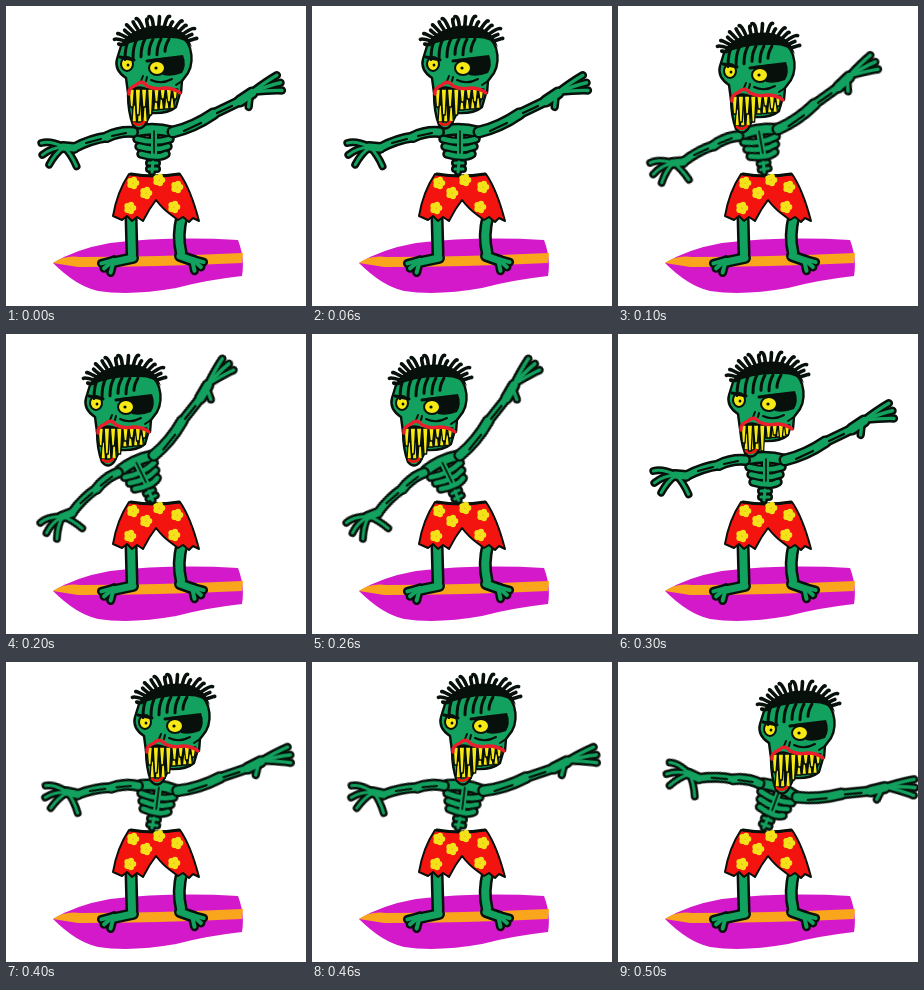
An HTML page for the animation above (600 ms loop, 300x300 px).

```html
<!DOCTYPE html>
<html lang="en">
<head>
<meta charset="utf-8">
<title>Surfing zombie</title>
<style>
  html, body { margin: 0; width: 100%; height: 100%; overflow: hidden; background: #fff; }
  svg { display: block; width: 100vw; height: 100vh; }
  path { fill: none; stroke-linecap: round; stroke-linejoin: round; }
  .soft { filter: blur(.6px); }
  #body { transform-origin: 147px 165px; }
</style>
</head>
<body>
<svg viewBox="0 0 300 300">
  <g id="board" class="soft"></g>
  <g id="legs"></g>
  <g id="shorts"></g>
  <g id="body"></g>
  <g id="head"><g id="jaw"></g><g id="skull"></g></g>
</svg>
<script>
  const INK = "#07100a", SKIN = "#12a15e", YELLOW = "#f6e914", RED = "#f3130f";
  const $ = id => document.getElementById(id);
  const range = n => [...Array(n).keys()];

  let seed = 7;
  const rand = () => (seed = seed * 16807 % 2147483647) / 2147483647;

  function draw(parent, d, fill, stroke = "none", width = 0) {
    const p = document.createElementNS("http://www.w3.org/2000/svg", "path");
    p.setAttribute("d", d);
    p.style.cssText = `fill:${fill};stroke:${stroke};stroke-width:${width}px`;
    $(parent).append(p);
  }
  const line = (parent, d, width = 2, color = INK) => draw(parent, d, "none", color, width);
  const oval = (x, y, rx, ry) => `M${x - rx} ${y}a${rx} ${ry} 0 1 0 ${2 * rx} 0a${rx} ${ry} 0 1 0 ${-2 * rx} 0Z`;

  // strokes that merge into one outlined shape
  function flesh(parent, parts) {
    parts.forEach(([d, w]) => line(parent, d, w + 5));
    parts.forEach(([d, w]) => line(parent, d, w, SKIN));
  }

  // fingers or toes: slightly bent strokes from one point
  const fan = (x, y, degrees, length, width, bend) => degrees.map(deg => {
    const a = deg * Math.PI / 180;
    const dx = length * Math.cos(a), dy = length * Math.sin(a);
    return [`M${x} ${y}q${dx * .6} ${dy * .6 - bend} ${dx} ${dy}`, width];
  });

  // board
  draw("board", "M47 257Q70 243 104 237Q165 230 232 234Q239 252 236 270Q200 274 170 282Q125 290 92 285Q70 280 47 257Z", "#d419cb");
  draw("board", "M47 257Q58 249 74 251Q150 251 237 247L236 257Q150 261 72 261Z", "#f9a61c");

  // legs
  flesh("legs", [
    ["M125 210L126 248", 8], ["M127 252L108 256", 7],
    ...fan(108, 254, [165, 140, 105], 13, 4, 0),
    ["M176 210Q171 230 175 246", 8], ["M174 250L188 255", 7],
    ...fan(186, 253, [15, 42, 78], 12, 4, 0)
  ]);

  // shorts
  draw("shorts", "M123 168Q148 172 174 168Q185 184 193 215L187 212L183 216L177 211L172 214L164 208Q157 203 150 194Q143 203 137 215L131 211L126 215L121 210L116 214L107 210Q111 186 123 168Z", RED, INK, 2);
  line("shorts", "M125 168Q148 172 173 168", 3);
  for (const [x, y] of [[127, 177], [153, 174], [171, 181], [140, 187], [124, 202], [168, 201]]) {
    const petals = range(5).map(i => oval(x + 3.3 * Math.cos(i * 1.257), y + 3.3 * Math.sin(i * 1.257), 3, 3));
    draw("shorts", petals.join(""), "#f3e21a");
  }

  // torso, arms and hands
  flesh("body", [
    ["M147 156L146 166", 3],
    ...range(2).map(i => [`M143 ${157 + 6 * i}h8`, 3]),
    ["M130 125Q148 121 166 126", 8], ["M148 126V148", 6],
    ...range(3).map(i => [`M${131 + 2 * i} ${133 + 7.5 * i}q17 5 ${33 - 4 * i} 0`, 4.5])
  ]);
  flesh("body", [
    ["M127 126Q113 125 101 131", 7], ["M101 131Q85 133 68 142", 6], ["M68 142L57 141", 7],
    ...fan(58, 141, [190, 160, 130, 57], 23, 3, 4),
    ["M167 126Q188 121 207 108", 8], ["M207 108L234 95", 6], ["M234 95L246 87", 8],
    ...fan(246, 86, [-34, -18, -3], 30, 3.4, 1),
    ...fan(244, 88, [96], 13, 3.4, 0)
  ]);
  line("body", "M120 127L106 130M95 133L80 137M178 125L195 117M211 107L226 100", 2.2);
  line("body", "M148 125V147", 1.6);

  // teeth taper from the gum to a blunt tip
  const tooth = (parent, x, y, w, h) =>
    draw(parent, `M${x} ${y}h${w}l${-w * .25} ${h}h${-w * .5}Z`, YELLOW, INK, 1.3);

  // jaw
  draw("jaw", "M122 88Q122 106 127 119Q133 126 139 119L145 107Q162 108 170 101L175 84Z", SKIN, INK, 2.4);
  draw("jaw", "M122 84L173 83L168 100L145 103L138 116L128 115Z", INK);
  range(8).forEach(i => tooth("jaw", 126 + i * 5.4, i < 3 ? 116 : 106 - i * .5, 4.6, i < 3 ? -17 : -11));
  line("jaw", "M128 117Q133 121 138 116", 2.6, RED);

  // skull
  draw("skull", "M115 40Q130 24 152 24Q178 24 184 42Q188 56 182 67L176 75L175 87Q157 80 142 84Q132 78 122 87L120 72Q108 64 111 53Z", SKIN, INK, 2.4);
  draw("skull", "M145 53Q160 51 177 49Q181 59 176 67Q166 71 157 69Z", INK);
  draw("skull", oval(121, 58, 6, 7) + oval(151, 62, 8, 7), YELLOW, INK, 2);
  draw("skull", oval(122, 59, 1.4, 1.6) + oval(150, 62, 1.6, 1.6), INK);
  line("skull", "M114 51L128 54M141 55L160 53", 3);
  line("skull", "M135 75L137 70M140 75L141 71M145 74Q155 79 166 73M176 75L170 79", 2);
  range(8).forEach(i => tooth("skull", 123 + i * 6.2, 83, 5.4, i < 4 ? 18 + i % 2 * 8 : 13 - i % 2 * 3));
  line("skull", "M123 88Q122 82 130 79Q136 73 141 80Q149 84 158 82Q168 82 174 87", 3.4, "#ea1f2b");

  // hair: a dark cap, loose tufts and strands on the forehead
  draw("skull", "M114 41Q120 25 145 20Q178 16 186 41Q178 31 162 32Q135 31 114 41Z", INK);
  range(17).forEach(i => {
    const a = Math.PI * (1.05 + i * .053), out = 7 + rand() * 5;
    const x = 150 + 33 * Math.cos(a), y = 42 + 22 * Math.sin(a);
    line("skull", `M${x} ${y}q${out * Math.cos(a)} ${out * Math.sin(a)} ${out * Math.cos(a) + rand() * 8 - 4} ${out * Math.sin(a) + 1}`, 3.6);
  });
  range(6).forEach(i => line("skull", `M${123 + i * 8} 33q-4 7 -4 ${20 - i * 2 + rand() * 4}`, 3));

  // each pose: lean of the torso, head x and y, jaw lift
  const STEP = 100;
  const poses = [
    [0, 0, 0, 0], [-10, -9, 7, -3], [-26, -31, 11, -2],
    [0, 0, 8, -8], [7, 18, 2, -2], [20, 31, 9, 0]
  ];
  function play(id, toTransform) {
    const keys = [...poses, poses[0]].map((p, i) => ({
      transform: toTransform(p), offset: i / poses.length, easing: "step-end"
    }));
    const motion = $(id).animate(keys, { duration: STEP * poses.length, iterations: Infinity });
    motion.startTime = 0;
  }
  play("body", ([lean]) => `rotate(${lean}deg)`);
  play("head", ([, x, y]) => `translate(${x}px, ${y}px)`);
  play("jaw", ([, , , lift]) => `translateY(${lift}px)`);
</script>
</body>
</html>
```
